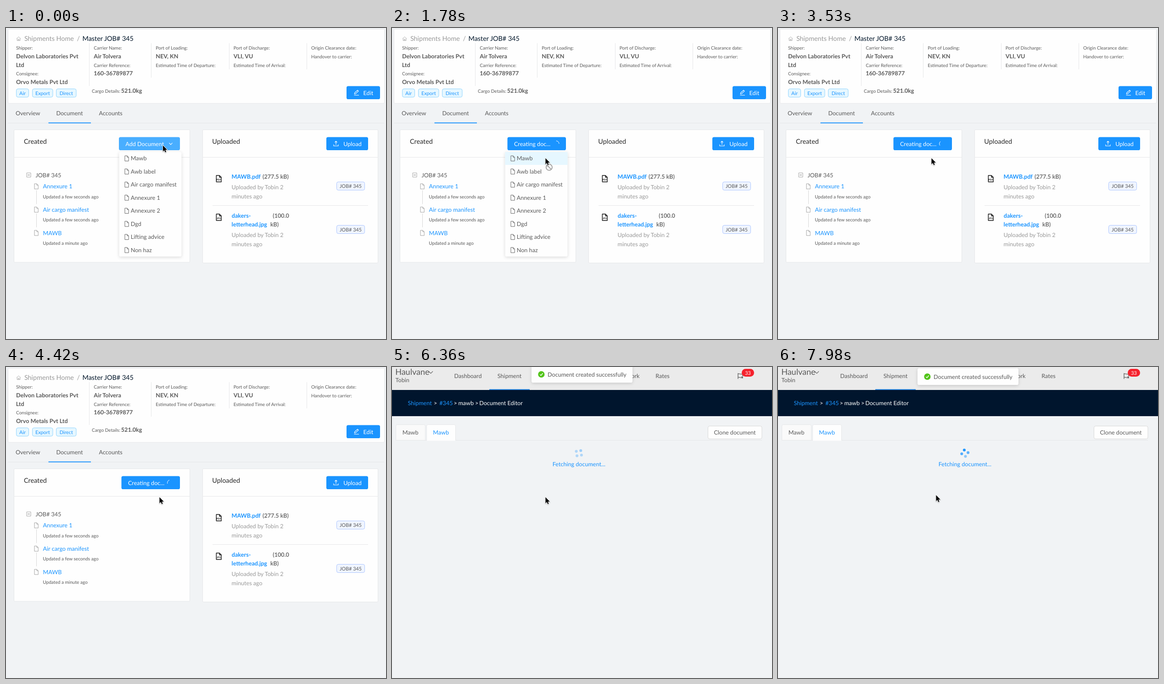
Animation, 828 px wide and 677 px high, one loop 8000 ms. Source, as an HTML page with a canvas:

```html
<!DOCTYPE html>
<html lang="en">
<head>
<meta charset="utf-8">
<title>Shipment documents</title>
<style>
html, body { margin: 0; width: 828px; height: 677px; overflow: hidden; background: #f1f3f5; }
canvas { display: block; width: 828px; height: 677px; }
</style>
</head>
<body>
<canvas id="stage" width="828" height="677"></canvas>
<script>
const ctx = document.getElementById('stage').getContext('2d');
const LOOP = 8000;
const BLUE = '#1a94ff', HOVER = '#49aeff', TEXT = '#595959', DARK = '#262626';
const MUTED = '#999', LINE = '#e6e7e9', PAGE = '#f1f3f5', CARD = '#fefefe';
const BASE = 12.6, SMALL = 10.08, TAG = 10.8, BIG = 14.4;

// y is the middle of the capital letters
function text(s, x, y, { size = BASE, color = TEXT, weight = 400, align = 'left' } = {}) {
  ctx.font = `${weight} ${size}px Lato, sans-serif`;
  ctx.textRendering = 'geometricPrecision';
  ctx.fillStyle = color;
  ctx.textAlign = align;
  ctx.fillText(s, x, y + size * 0.36);
}

function box(x, y, w, h, { fill, stroke, r = 0, shadow = 0 } = {}) {
  ctx.save();
  ctx.beginPath();
  ctx.roundRect(x, y, w, h, r);
  if (shadow) {
    ctx.shadowColor = `rgba(0,0,0,${shadow})`;
    ctx.shadowBlur = 7;
    ctx.shadowOffsetY = 1.8;
  }
  if (fill) { ctx.fillStyle = fill; ctx.fill(); }
  ctx.shadowColor = 'transparent';
  if (stroke) { ctx.strokeStyle = stroke; ctx.lineWidth = 1; ctx.stroke(); }
  ctx.restore();
}

function rect(x, y, w, h, color) {
  ctx.fillStyle = color;
  ctx.fillRect(x, y, w, h);
}

// strokes an SVG path moved to x, y
function icon(d, x, y, color, width = 1, fill) {
  ctx.save();
  ctx.translate(x, y);
  const p = new Path2D(d);
  if (fill) { ctx.fillStyle = fill; ctx.fill(p); }
  ctx.strokeStyle = color;
  ctx.lineWidth = width;
  ctx.lineJoin = 'round';
  ctx.stroke(p);
  ctx.restore();
}

function disc(x, y, r, color) {
  ctx.fillStyle = color;
  ctx.beginPath();
  ctx.arc(x, y, r, 0, Math.PI * 2);
  ctx.fill();
}

const PAGE_ICON = 'M-4-5.7H1L4.2-2.5V5.7H-4ZM1-5.7V-2.5H4.2';
const CHEVRON = 'M-3.5-1.8L0 1.8L3.5-1.8';
const ARROW = 'M0 0V13L2.9 10.3L4.9 14.9L7 14L5.1 9.5H9.2Z';

function pointer(x, y) {
  ctx.save();
  ctx.shadowColor = 'rgba(0,0,0,.3)';
  ctx.shadowBlur = 2;
  ctx.shadowOffsetY = 1;
  icon(ARROW, x, y, '#fff', 1.7);
  ctx.restore();
  icon(ARROW, x, y, '#000', 0.1, '#000');
}

function forbidden(x, y) {
  disc(x, y, 8.5, '#fff');
  ctx.strokeStyle = '#a3a3a3';
  ctx.lineWidth = 2;
  ctx.beginPath();
  ctx.arc(x, y, 6.6, 0, Math.PI * 2);
  ctx.moveTo(x - 4.6, y - 4.6);
  ctx.lineTo(x + 4.6, y + 4.6);
  ctx.stroke();
}

function field(label, value, x, y) {
  text(label, x, y, { size: SMALL });
  if (value) text(value, x, y + 17.9, { weight: 700 });
}

function tag(s, x, y, w, fill, stroke, color) {
  box(x, y, w, 18, { fill, stroke, r: 3.6 });
  text(s, x + w / 2, y + 9.2, { size: TAG, color, align: 'center' });
}

function header() {
  box(4.5, 2.5, 820, 161.5, { fill: CARD, stroke: LINE, r: 2 });
  icon('M-4.5 0L0-4L4.5 0M-3.3-.6V4.2H3.3V-.6M-1 4V1.4H1V4', 27.5, 23.2, '#a8a8a8', 0.9);
  text('Shipments Home', 39.9, 23, { size: BIG, color: MUTED });
  text('/', 154.5, 23, { size: BIG, color: MUTED });
  text('Master JOB# 345', 166.5, 23, { size: BIG, color: '#001529' });

  field('Shipper:', 'Delvon Laboratories Pvt', 22, 43.6);
  text('Ltd', 21.8, 80.3, { weight: 700 });
  field('Consignee:', 'Orvo Metals Pvt Ltd', 22, 99.6);
  field('Carrier Name:', 'Air Tolvera', 191.2, 43.6);
  field('Carrier Reference:', '160-36789877', 191.2, 81);
  field('Port of Loading:', 'NEV, KN', 326.2, 43.6);
  field('Estimated Time of Departure:', '', 326.2, 81);
  field('Port of Discharge:', 'VLI, VU', 495.7, 43.6);
  field('Estimated Time of Arrival:', '', 495.7, 81);
  field('Origin Clearance date:', '', 665, 43.6);
  field('Handover to carrier:', '', 665, 62.4);
  field('Cargo Details:', '', 187, 137);
  text('521.0kg', 250.8, 136.5, { weight: 700 });
  for (const [x, h] of [[181, 93], [316, 75], [486, 57], [655, 57]]) rect(x, 33, 1, h, LINE);

  const tags = [['Air', 22.5, 27], ['Export', 57.5, 44.5], ['Direct', 109.5, 43.5]];
  for (const [s, x, w] of tags) tag(s, x, 132.5, w, '#e6f7ff', '#91d5ff', BLUE);

  box(742, 126.5, 73, 28.5, { fill: BLUE, r: 3.6 });
  icon('M-4.5 5.3H6M-3.8 2.6L-3.2 0L3-5.6L5-3.6L-1.2 2.2Z', 763, 141, '#fff', 1.1);
  text('Edit', 778.6, 141.5, { color: '#fff' });
}

function tabs() {
  rect(4, 206.5, 820, 1, '#e4e6e8');
  text('Overview', 47.7, 185.3, { align: 'center' });
  text('Document', 138.5, 185.3, { align: 'center' });
  text('Accounts', 228.2, 185.3, { align: 'center' });
  rect(92.5, 205.6, 92.5, 1.9, BLUE);
}

function created() {
  box(17.5, 221.5, 383, 288.5, { fill: CARD, stroke: LINE, r: 1.8 });
  rect(18, 281, 382, 1, LINE);
  text('Created', 38.9, 247.2, { size: BIG, color: DARK });
  box(45, 315.5, 9, 9, { fill: CARD, stroke: '#a6a6a6' });
  rect(47, 319.5, 5, 1, '#777');
  text('JOB# 345', 64.4, 320);
  const docs = [['Annexure 1', 'a few seconds'], ['Air cargo manifest', 'a few seconds'], ['MAWB', 'a minute']];
  docs.forEach(([name, age], i) => {
    const y = 344.7 + i * 50.7;
    icon(PAGE_ICON, 66, y, '#9a9a9a', 0.9);
    text(name, 80.6, y, { color: BLUE });
    text(`Updated ${age} ago`, 80.3, y + 22.4, { size: SMALL });
    if (i < 2) rect(66, y + 8.5, 1, 30, '#d6d6d6');
  });
}

function fileRow(kind, y, tagY) {
  icon('M-5.2-7H1.6L5.6-3V7H-5.2ZM1.6-7V-3H5.6', 463.5, y, '#111', 1.4);
  text(kind, 463.6, y + 2, { size: 5, color: '#111', weight: 700, align: 'center' });
  tag('JOB# 345', 720.5, tagY, 61, '#f0f5ff', '#adc6ff', TEXT);
}

function uploaded() {
  box(428.5, 221.5, 382, 290, { fill: CARD, stroke: LINE, r: 1.8 });
  rect(429, 281, 381, 1, LINE);
  text('Uploaded', 449.3, 247.2, { size: BIG, color: DARK });
  box(698, 237.5, 91, 28.5, { fill: BLUE, r: 3.6 });
  icon('M-5 2V5.2H5V2M0 2.6V-5M-2.7-2.4L0-5.2L2.7-2.4', 719, 251.6, '#fff', 1.1);
  text('Upload', 735.2, 252, { color: '#fff' });

  const link = { color: BLUE, weight: 700 }, bold = { weight: 600 }, grey = { color: MUTED };
  fileRow('PDF', 328, 335);
  text('MAWB.pdf', 491.5, 323.5, link);
  text('(277.5 kB)', 559, 323.5, bold);
  text('Uploaded by Tobin 2', 491.4, 346.5, grey);
  text('minutes ago', 491.6, 366, grey);
  rect(450, 386, 339, 1, LINE);
  fileRow('JPG', 412, 429.5);
  text('dakers-', 491.8, 408, link);
  text('(100.0', 581.3, 408, bold);
  text('letterhead.jpg', 491.6, 427.5, link);
  text('kB)', 576, 427.5, bold);
  text('Uploaded by Tobin 2', 491.4, 450.5, grey);
  text('minutes ago', 491.6, 470, grey);
}

function addButton(hover) {
  box(246, 237.5, 133, 28.5, { fill: hover ? HOVER : BLUE, r: 3.6 });
  text('Add Document', 260.3, 252, { color: '#fff' });
  icon(CHEVRON, 359, 252, '#fff', 1.1);
}

function loadingButton(k) {
  box(251.5, 237.5, 127.5, 28.5, { fill: BLUE, r: 3.6 });
  text('Creating doc...', 266, 252, { color: '#fff' });
  const a = (k * 54 - 90) * Math.PI / 180;
  ctx.strokeStyle = '#fff';
  ctx.lineWidth = 1;
  ctx.beginPath();
  ctx.arc(357.8, 252, 6.2, a, a + Math.PI / 2);
  ctx.stroke();
}

function menu(active) {
  box(246.5, 269.5, 136, 228, { fill: CARD, r: 3.6, shadow: 0.15 });
  if (active) rect(246.5, 270, 136, 28, '#e6f7ff');
  const items = ['Mawb', 'Awb label', 'Air cargo manifest', 'Annexure 1', 'Annexure 2', 'Dgd', 'Lifting advice', 'Non haz'];
  items.forEach((s, i) => {
    const y = 283.9 + i * 28.5;
    icon(PAGE_ICON, 263, y, '#666', 1);
    text(s, 271.8, y);
  });
}

// the picture advances in ticks, eight to a group
const GROUPS = [1780, 2950, 4130, 5320, 6500, 7680];
function tick(t) {
  const g = GROUPS.filter(s => t >= s).length - 1;
  return g * 8 + Math.min(7, Math.floor((t - GROUPS[g] + 4) / 147));
}

const APPROACH = [[0, 342, 255.7], [140, 340, 262], [290, 337, 272], [440, 335, 281], [580, 334.5, 283.4]];

function listScene(t) {
  rect(0, 0, 828, 677, PAGE);
  header();
  tabs();
  created();
  uploaded();
  const [, x, y] = APPROACH.filter(p => t >= p[0]).pop();
  const busy = t >= 1780, open = t < 1930;
  if (busy) loadingButton(tick(t));
  else addButton(y < 266);
  if (open) menu(y > 270);
  if (busy && open) forbidden(342.4, 303.2);
  pointer(x, y);
}

function topBar() {
  rect(0, 0, 828, 50, '#ebebeb');
  text('Haulvane', 7.2, 10.5, { size: 18 });
  icon('M-4.5-2.2L0 2.4L4.5-2.2', 84.5, 11.5, TEXT, 1.1);
  text('Tobin', 7.6, 28);
  text('Dashboard', 165.5, 19, { align: 'center' });
  text('Shipment', 256, 19, { align: 'center' });
  text('Network', 539.4, 19, { align: 'right' });
  text('Rates', 589.5, 19, { align: 'center' });
  rect(212, 48.2, 88, 1.8, '#2b8ae6');
  icon('M-5-6V6.5M-5-5L5-3.5V4.5L-5 2.5M5 4.5L2 1', 759, 19.5, '#444', 1.1);
  box(762, 4, 27, 17, { fill: '#f5222d', r: 8.5 });
  text('33', 775.5, 12.8, { size: TAG, color: '#fff', align: 'center' });

  rect(0, 50, 828, 57, '#00152d');
  const white = { color: '#fff' }, link = { color: BLUE };
  text('Shipment', 34.4, 78.7, link);
  text('>', 91, 78.7, white);
  text('#345', 103.3, 78.7, link);
  text('>', 134.5, 78.7, white);
  text('mawb', 144.5, 78.7, white);
  text('>', 181, 78.7, white);
  text('Document Editor', 190.2, 78.7, white);
}

function editorTabs() {
  rect(8, 159, 798, 1, '#e4e6e8');
  box(8.5, 125.5, 64, 34, { fill: '#fafafa', stroke: LINE, r: [3, 3, 0, 0] });
  box(75.5, 125.5, 63, 34, { fill: CARD, stroke: LINE, r: [3, 3, 0, 0] });
  rect(76, 158.5, 62, 2, CARD);
  text('Mawb', 40.2, 142.7, { align: 'center' });
  text('Mawb', 106.6, 142.7, { color: BLUE, align: 'center' });
  box(688.5, 128.5, 117.5, 28, { fill: CARD, stroke: '#d9d9d9', r: 3.6 });
  text('Clone document', 747, 142.7, { align: 'center' });
}

function spinner(sec) {
  for (let i = 0; i < 4; i++) {
    const a = (i * 90 - 90 + sec * 300) * Math.PI / 180;
    const phase = Math.max(0, sec - i * 0.4) % 2;
    ctx.globalAlpha = 0.3 + 0.7 * (1 - Math.abs(1 - phase));
    disc(407.2 + Math.cos(a) * 7, 187.7 + Math.sin(a) * 7, 3.05, BLUE);
  }
  ctx.globalAlpha = 1;
  text('Fetching document...', 407.3, 211.3, { color: BLUE, align: 'center' });
}

function toast(dy) {
  box(304, 2.5 + dy, 220, 36.5, { fill: CARD, r: 3.6, shadow: 0.15 });
  disc(325.4, 21 + dy, 7.1, '#52c41a');
  icon('M-3 .2L-.8 2.5L3.2-2.5', 325.4, 21 + dy, '#fff', 1.4);
  text('Document created successfully', 339, 21.5 + dy);
}

const ramp = (n, a, b) => Math.min(1, Math.max(0, (n - a) / (b - a)));

function editorScene(t) {
  const n = Math.max(0, tick(t) - 31);
  rect(0, 0, 828, 677, PAGE);
  topBar();
  editorTabs();
  spinner(0.12 + n * 0.1495);
  toast(n ? 0 : -5);
  const p = ramp(n, 4, 8), q = ramp(n, 8, 11);
  pointer(334.5 + 8 * p + 2 * q, 283.4 - 2.9 * p - 1.5 * q);
}

function draw(now) {
  const t = now % LOOP;
  if (t < 6360) listScene(t);
  else editorScene(t);
}

let start;
function frame(now) {
  start ??= now;
  draw(Math.max(0, now - start));
  requestAnimationFrame(frame);
}
draw(0);
requestAnimationFrame(frame);
</script>
</body>
</html>
```
